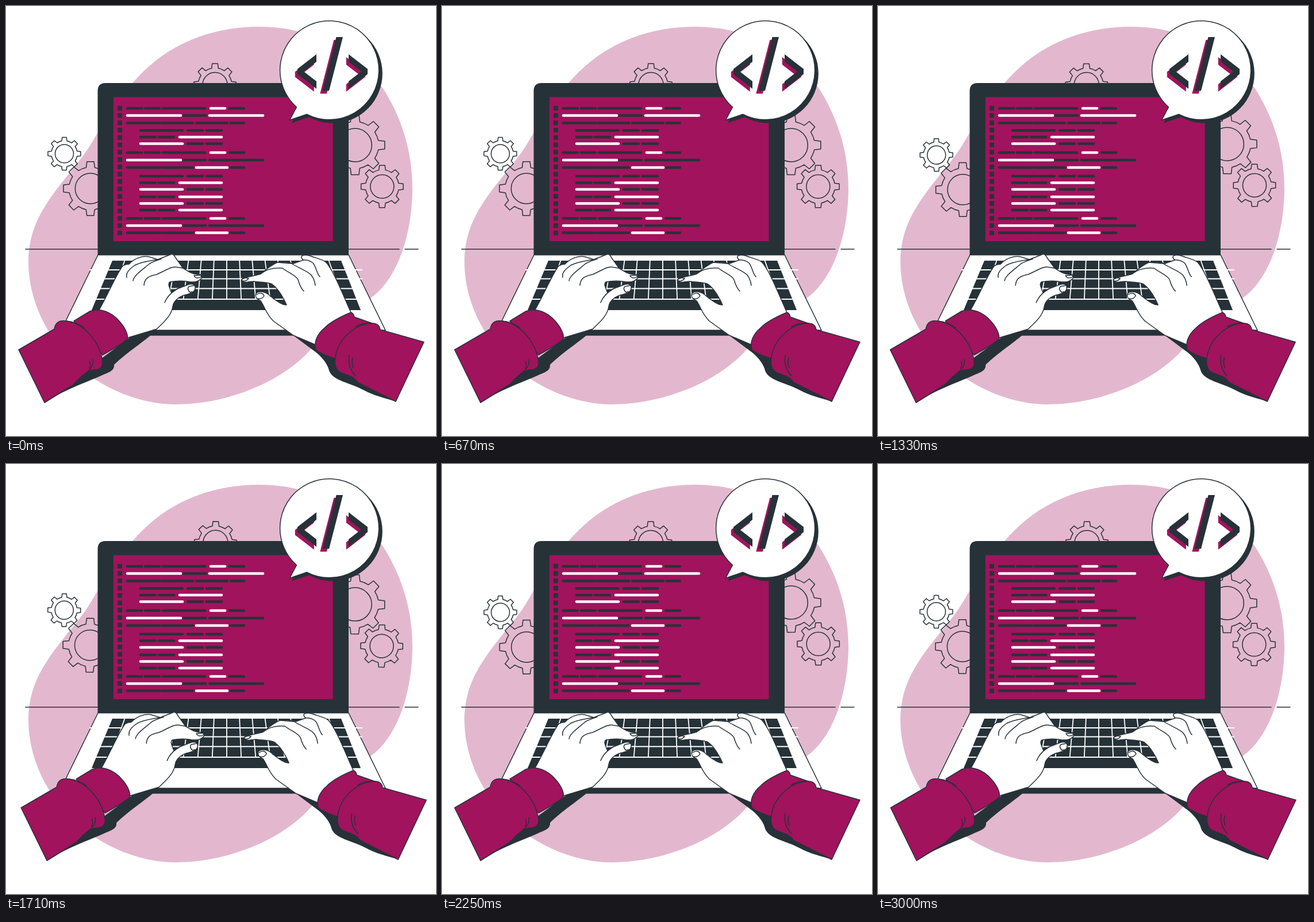
An HTML page that plays this animation: 748 px wide and 748 px high, repeating every 3.04 s.

```html
<!DOCTYPE html>
<html lang="en">
<head>
<meta charset="utf-8">
<title>Typing on a laptop</title>
<style>
html, body { margin: 0; width: 100%; height: 100%; overflow: hidden; background: #fff; }
svg { display: block; width: 100%; height: 100%; }
.ink { fill: #263238; }
.pink { fill: #a1135d; }
.line { fill: none; stroke: #263238; stroke-width: 1.5; stroke-linecap: round; stroke-linejoin: round; }
.line .pink, .skin { stroke: #263238; }
.skin { fill: #fff; }
#code { stroke-width: 4.6; stroke-linecap: round; }
</style>
</head>
<body>
<svg viewBox="0 0 748 748">
  <path fill="#e3b8ce" d="M440 36C540 36 620 85 660 150C690 200 707 255 707 320C706 395 683 475 632 510C590 540 560 563 525 603C475 656 380 694 293 693C220 692 150 655 110 612C65 565 38 505 39 440C41 395 55 365 82 327C105 295 131 268 146 243C165 212 185 176 220 134C270 75 345 36 440 36Z"/>
  <g id="gears" class="line"></g>
  <path class="line" d="M34 423H684M694 423H717"/>

  <!-- laptop -->
  <path class="ink" d="M159.5 434V148Q159.5 134 173 134H582Q596 134 596 148V434Z"/>
  <path class="pink" d="M187 158.500H568.500V409H187Z"/>
  <g id="code"></g>
  <path class="skin line" style="fill:#fff" d="M160 433H596L660 564H96Z"/>
  <path class="ink" d="M96 564H660L652 573.500H104Z"/>
  <path class="ink" d="M185 443H583L617 529H149Z"/>
  <path id="keys" fill="none" stroke="#fff" stroke-width="1.8"/>

  <!-- speech bubble -->
  <g id="bubble">
    <g class="ink" transform="translate(3.500 4.500)">
      <circle cx="565" cy="113" r="86.300"/><path d="M505 175L493.500 199L526 188Z"/>
    </g>
    <g class="line" style="fill:#fff">
      <path d="M505.500 176A86 86 0 1 1 523.500 188.300L493.500 198.500Z"/>
    </g>
    <g id="tag">
      <path d="M540 84V97L518 114L540 131V144L507 118.500V109.500Z"/>
      <path d="M574.500 54H586L562 147.500H550.500Z"/>
      <path d="M596 84V97L618 114L596 131V144L629 118.500V109.500Z"/>
    </g>
  </g>

  <g id="hands">
    <path class="ink" d="M208 582L220 573L264 553L262 562C250 578 215 598 188 624C189 633 181 637 170 641C145 653 108 664 67 690L130 640Z"/>
    <path class="ink" d="M497 571L540 578L580 610L678 688C660 682 640 678 622 668C598 655 568 652 562 634C560 625 553 614 540 603Z"/>
    <g class="line">
      <path class="skin" d="M160 532C176 505 190 470 203 452Q208 449 214 449C222 440 236 434 248 436L264 441L287 432C291 431 293 434 295 438L308 456C316 461 324 467 334 467C342 467 343 473 336 477C332 480 328 480 320 480C307 477 296 478 285 480C281 483 284 489 288 499L298 492L316 485C326 482 330 485 329 491C329 497 322 500 314 502C300 505 291 514 290 523C288 537 278 547 262 562L212 577Z"/>
      <path d="M210 472C208 463 216 457 224 451C235 445 252 443 263 441M221 478C222 469 237 459 250 448Q257 444 270 440M240 486C241 474 247 470 262 467C278 460 287 453 295 454L308 456M327 469L339 468Q341 473 333 473Q329 473 327 469M276 516C280 506 286 499 298 492M328 486L318 488Q314 492 320 498L324 497"/>
      <path class="skin" d="M600 533C585 500 570 460 556 445C548 440 538 438 530 435C522 432 512 433 514 438L517 442L500 448C490 445 480 445 472 446Q462 450 443 466C432 470 420 470 411 475C408 478 414 482 421 480L431 479C445 481 455 480 463 484C474 492 481 504 488 520C479 520 470 512 460 505C452 496 440 495 435 500C433 505 436 510 443 513C451 525 452 535 465 548L500 573L540 590Z"/>
      <path d="M443 466C455 456 471 455 481 456C491 464 505 469 508 476Q512 490 518 496M472 446L497 448C509 456 525 461 531 468Q537 476 538 486M516 442Q526 441 534 447C540 454 540 465 546 471M411 475Q413 471 422 474Q417 480 411 478M436 502Q445 496 449 504Q445 511 437 509"/>

      <path class="pink" d="M118 548L146 531C164 524 184 533 197 548C208 560 213 573 211 579Q206 586 168 607Z"/>
      <path class="pink" d="M22 598L84 562C86 549 95 546 105 548C136 552 164 585 168 619C169 629 162 633 152 633C140 635 130 645 118 658L67 690Z"/>
      <path d="M105 548C117 549 127 553 136 560M151 615C153 625 147 632 136 641M145 618Q148 624 145 630"/>
      <path class="pink" d="M600 533Q605 535 606 541L640 553L572 613Q549 606 539 598C535 585 541 571 554 560C565 549 583 540 600 533Z"/>
      <path class="pink" d="M727 584.500L678 688L612 655C605 643 592 643 581 637C574 633 571 624 573 611C577 581 606 552 638 552C647 552 650 557 651 563Z"/>
      <path d="M638 552C628 551 617 553 608 558M597 608C595 622 599 634 608 643M603 612Q601 622 604 629"/>
    </g>
  </g>
</svg>
<script>
const $ = id => document.getElementById(id);
const INK = '#263238', WHITE = '#fff';

// Gears: eight tapered teeth joined by arcs
function gear([x, y, r, hole]) {
  const root = r * 0.79;
  const at = (rad, a) => `${(x + rad * Math.cos(a)).toFixed(2)} ${(y + rad * Math.sin(a)).toFixed(2)}`;
  let d = '';
  for (let k = 0; k < 8; k++) {
    const a = k * Math.PI / 4;
    d += (k ? `A${root} ${root} 0 0 1 ` : 'M') + at(root, a - 0.2) +
      `L${at(r, a - 0.13)}L${at(r, a + 0.13)}L${at(root, a + 0.2)}`;
  }
  return `<path d="${d}A${root} ${root} 0 0 1 ${at(root, -0.2)}Z"/><circle cx="${x}" cy="${y}" r="${hole}"/>`;
}
$('gears').innerHTML = [
  [101.5, 257.5, 28.7, 16], [147, 318, 47.3, 26.5], [363.3, 137, 37, 21.5],
  [607.3, 241.5, 52, 29], [654.5, 313.5, 37, 20.5]
].map(gear).join('');

// Code rows: spans of x, negative start means white
const rows = {
  A: [[211, 236], [242, 267], [273, 346], [-356, 381], [389, 414]],
  B: [[-211, 304], [309, 347], [-354, 447]],
  b: [[-211, 304], [309, 347], [354, 447]],
  C: [[211, 267], [271, 325], [331, 385], [391, 414]],
  c: [[211, 267], [271, 325], [-331, 385], [391, 414]],
  D: [[234, 307], [316, 342], [349, 375]],
  E: [[234, 260], [266, 292], [-302, 375]],
  F: [[-234, 307], [316, 342], [349, 375]]
};
const rowY = [178, 190.5, 203.5, 216.5, 228, 239.5, 255, 268, 281, 296, 307.5, 319, 332, 343.5, 355, 369.5, 382, 394.5];
$('code').innerHTML = [...'ABCDEFAbcDEFEFEAbc'].map((type, i) =>
  `<rect x="194" y="${173.7 + i * 12.77}" width="8" height="8" fill="${INK}"/>` +
  rows[type].map(([a, b]) =>
    `<path d="M${Math.abs(a)} ${rowY[i]}H${b}" stroke="${a < 0 ? WHITE : INK}"/>`).join('')
).join('');

// Keyboard grid fanning out towards the viewer
let grid = '';
for (const y of [459, 474.5, 491.5, 510]) grid += `M145 ${y}H620`;
for (let k = -8; k <= 8; k++) {
  const end = Math.abs(k) > 6 ? 529 : 510;
  grid += `M${384 + 22.2 * k} 443L${384 + k * (22.2 + 3.8 * (end - 443) / 86)} ${end}`;
}
$('keys').setAttribute('d', grid);

const tag = $('tag').innerHTML;
$('tag').innerHTML = `<g class="pink" transform="translate(-4.2 5)">${tag}</g><g class="ink">${tag}</g>`;

// Piecewise linear value of evenly spaced keys at phase p
function keyed(keys, p) {
  const f = p * (keys.length - 1), i = Math.floor(f);
  return keys[i] + (keys[i + 1] - keys[i]) * (f - i);
}
const shake = [0, -1.5, 3, -6, 6, -6, 6, -6, 3, -1.5, 0];
const sway = [0, 1, 0, -1, 0];

const start = performance.now();
function draw() {
  const t = (performance.now() - start) % 3040;
  const step = Math.min(72, Math.floor((t + 5) * 0.024)); // 24 steps per second
  const s = (step + 1) / 24;
  $('hands').setAttribute('transform', `translate(${keyed(shake, s / 3 % 1) + 0.2} 0)`);
  $('gears').setAttribute('transform', `rotate(${keyed(sway, s / 1.5 % 1)} 382 232)`);
  requestAnimationFrame(draw);
}
draw();
</script>
</body>
</html>
```
